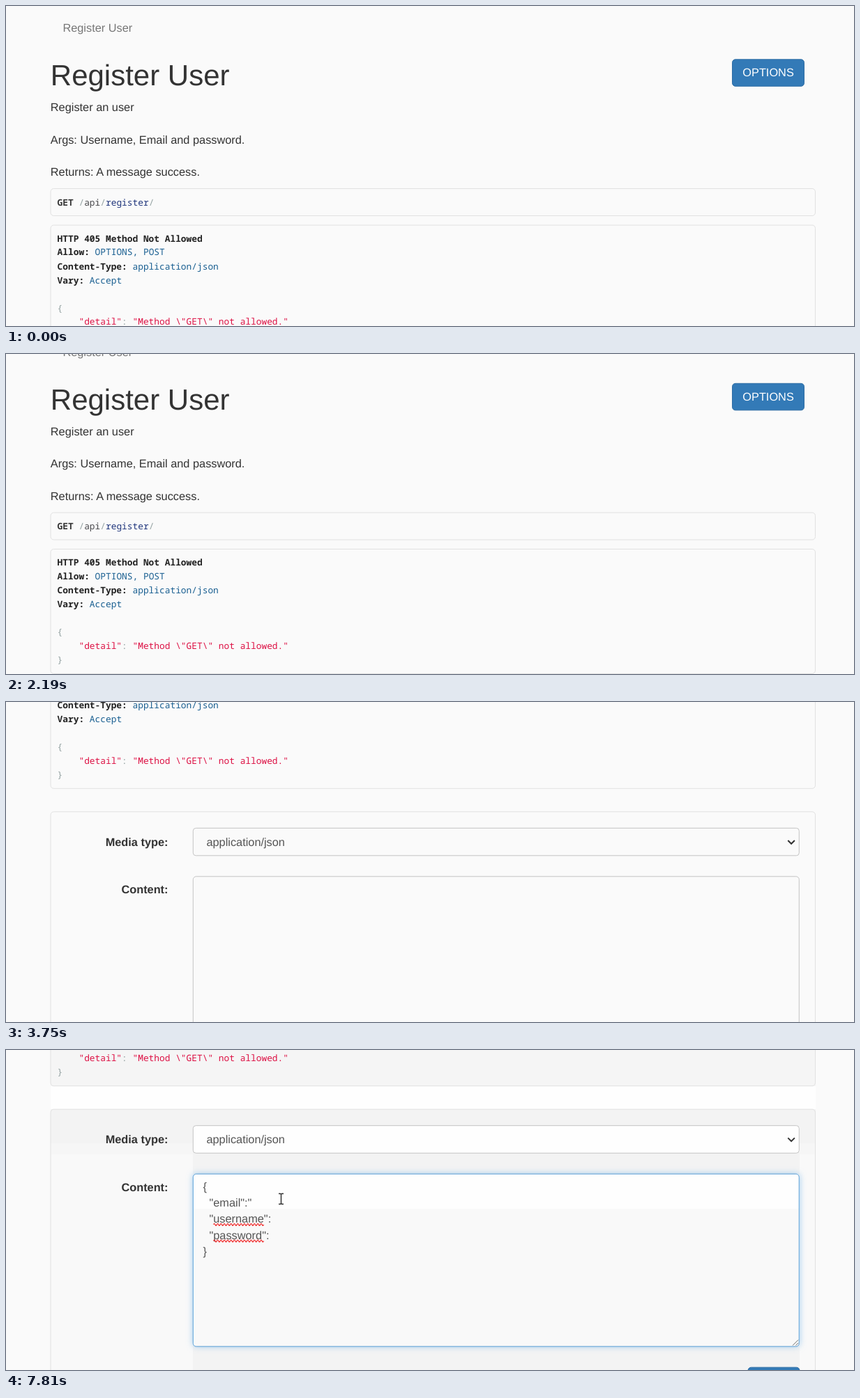
Write an HTML page that moves like this. It is 1216 px wide and 460 px high and loops after 8 s.

```html
<!DOCTYPE html>
<html lang="en">
<head>
<meta charset="utf-8">
<title>Register User</title>
<style>
  html, body { margin: 0; width: 100%; height: 100%; overflow: hidden; background: #fafafa; }
  svg { display: block; font: 16.33px "Liberation Sans", Arial, sans-serif; fill: #333; }
  text { white-space: pre; text-rendering: geometricPrecision; }
  .mono { font: 12.85px "Noto Sans Mono", monospace; }
  b, .b { font-weight: bold; }
  .label { font-weight: bold; text-anchor: end; }
  .head { font-weight: bold; fill: #222; }
  .lit { fill: #195f91; } .str { fill: #d14; } .pun { fill: #93a1a1; }
  .pln { fill: #48484c; } .kwd { fill: #1e347b; }
  .box { fill: none; stroke: #e1e1e1; }
  .field { fill: none; stroke: #c4c4c4; }
  .btn { fill: #337ab7; stroke: #2e6da4; }
  .hover { fill: #286090; stroke: #204d74; }
  .input { fill: #555; }
  .wavy { fill: none; stroke: #f02020; stroke-width: 1.2; }
  .line { fill: none; stroke: #333; }
  #glow { fill: #f9f9f9; filter: drop-shadow(0 0 4.7px rgba(102, 175, 233, .6)); }
</style>
</head>
<body>
<svg width="1216" height="460" viewBox="0 0 1216 460">
  <g id="shade">
    <rect x="64" width="1097" height="52" fill="#f5f5f5"/>
    <rect x="64" y="52" width="1097" height="33" fill="#fefefe"/>
    <rect x="64" y="85" width="1097" height="375" fill="#f9f9f9"/>
    <rect x="64" y="85" width="1097" height="49" fill="#f3f3f3"/>
    <rect x="64" y="134" width="1097" height="16" fill="#f6f6f6"/>
    <rect x="268" y="134" width="870" height="326" fill="#f3f3f3"/>
    <rect x="268" y="109" width="870" height="39" rx="4" fill="#fefefe"/>
    <rect id="glow" x="268" y="178" width="870" height="248" rx="4.7"/>
    <rect x="268" y="178" width="870" height="248" rx="4.7" fill="#f9f9f9"/>
    <rect x="268.5" y="178.5" width="869" height="50" rx="4" fill="#fefefe"/>
  </g>

  <g id="page">
    <text x="81.4" y="37" fill="#777">Register User</text>
    <text x="63.8" y="114" font-size="42">Register User</text>
    <rect id="options" class="btn" x="1041.5" y="76.8" width="103" height="38.5" rx="4.5"/>
    <text x="1056.3" y="101" fill="#fff">OPTIONS</text>
    <text x="63.8" y="151">Register an user</text>
    <text x="63.8" y="197.7">Args: Username, Email and password.</text>
    <text x="63.8" y="244.4">Returns: A message success.</text>

    <rect class="box" x="64" y="262.5" width="1096.5" height="39" rx="4.5"/>
    <rect class="box" x="64" y="315" width="1096.5" height="179" rx="4.5"/>
    <g class="mono">
      <text x="73.6" y="286.5"><tspan class="b">GET</tspan> <tspan class="pun">/</tspan><tspan class="pln">api</tspan><tspan class="pun">/</tspan><tspan class="kwd">register</tspan><tspan class="pun">/</tspan></text>
      <text x="73.6" y="338.6" class="head">HTTP 405 Method Not Allowed</text>
      <text x="73.6" y="358.4"><tspan class="head">Allow:</tspan> <tspan class="lit">OPTIONS, POST</tspan></text>
      <text x="73.6" y="378.6"><tspan class="head">Content-Type:</tspan> <tspan class="lit">application/json</tspan></text>
      <text x="73.6" y="398.5"><tspan class="head">Vary:</tspan> <tspan class="lit">Accept</tspan></text>
      <text x="73.6" y="438.5" class="pun">{</text>
      <text x="73.6" y="458.3" class="str">    "detail"<tspan class="pun">:</tspan> "Method \"GET\" not allowed."</text>
      <text x="73.6" y="478.7" class="pun">}</text>
    </g>

    <rect class="box" x="64" y="527.5" width="1096.5" height="460" rx="4.5"/>
    <text class="label" x="232.5" y="576.3">Media type:</text>
    <rect class="field" x="268.3" y="551" width="869" height="39.5" rx="4"/>
    <text class="input" x="287.4" y="576.3">application/json</text>
    <path class="line" stroke-width="2" d="M1121.3 568.7l4.8 4.8 4.8-4.8"/>
    <text class="label" x="232.5" y="645">Content:</text>
    <rect class="field" x="268.3" y="620.5" width="869" height="248" rx="4.5"/>
    <rect id="focus" class="field" x="268.3" y="620.5" width="869" height="248" rx="4.5" style="stroke:#66afe9"/>
    <path class="line" stroke-opacity=".7" d="M1128 867l8-8M1132.500 867l3.500-3.500"/>
    <rect class="btn" x="1064" y="898.5" width="74" height="39" rx="4.5"/>
  </g>

  <g id="json" class="input">
    <text x="282.4" y="201.700">{</text>
    <text id="email" x="282.4" y="225"></text>
    <text x="282.4" y="248.300">  "username":</text>
    <text x="282.4" y="271.600">  "password":</text>
    <text x="282.4" y="294.900">}</text>
    <path id="waves" class="wavy"/>
  </g>
  <path id="caret" class="line" d="M0 0v18.500"/>

  <g id="pointer">
    <path id="arrow" d="M.5.5v15.500l3.600-3.400 2.600 5.600 2.400-1.100-2.600-5.500h5z" fill="#fff" stroke="#000"/>
    <path id="hand" d="M4 1q1.500-1 2.500.5v6l7 1.700q1.500.6 1 3l-1.500 6h-7l-5-6q0-2 2-1l1 1z" fill="#fff" stroke="#000"/>
    <path id="beam" class="line" stroke-width="1.500" d="M-3.500-7.500h2.500l1 1 1-1h2.500M0-6.500v13M-3.500 7.500h2.500l1-1 1 1h2.500"/>
  </g>
</svg>
<script>
const LOOP = 8000;
const $ = id => document.getElementById(id);
const show = (id, on) => { $(id).style.display = on ? "" : "none"; };
const place = (id, x, y) => $(id).setAttribute("transform", `translate(${x} ${y})`);

// Each track is a list of [time, ...values]; a value holds until the next entry.
const scroll = [
  [0, 0], [1980, 2], [2050, 9], [2120, 20], [2190, 34.5], [2270, 50], [2310, 57.5], [2640, 61.5],
  [2790, 65], [2860, 73], [2930, 82], [3000, 90], [3070, 96],
  [3390, 101], [3460, 127], [3530, 172], [3600, 235], [3680, 310], [3750, 369.7],
  [3840, 402], [3900, 422], [3960, 434], [4030, 440], [4090, 442.3]
];
const pointer = [
  [0], [70, "arrow", 880, 236], [200, "arrow", 876, 201], [380, "arrow", 897, 184],
  [460, "arrow", 947, 148], [540, "arrow", 1016, 110], [610, "hand", 1043, 100],
  [690, "hand", 1082, 95], [770, "hand", 1125, 91], [840, "arrow", 1188, 85], [920],
  [4280, "arrow", 1120, 271], [4350, "beam", 1010, 270], [4420, "beam", 890, 268],
  [4490, "beam", 797, 265], [4560, "beam", 769, 261.5],
  [5320, "beam", 740, 259], [5390, "beam", 669, 255], [5460, "beam", 547, 252],
  [5530, "beam", 440, 240], [5600, "beam", 415, 226], [5670, "beam", 402, 218],
  [5740, "beam", 395, 214], [5860, "beam", 392, 213], [5930, "beam", 394.5, 214]
];
const caret = [
  [0], [4640, 283.5, 187.5], [5110], [5180, 289, 280.5], [5710], [5860, 346.5, 210.5],
  [6400], [6950, 346.5, 210.5], [7350, 353.5, 210.5], [7810]
];
const at = (track, t) => track.findLast(step => step[0] <= t);

const wave = (x, y, n) => `M${x} ${y}` + "q1.200-3 2.400 0t2.400 0".repeat(n);
$("waves").setAttribute("d", wave(297.5, 251, 15) + wave(297.5, 274.500, 15));

function draw(now) {
  const t = now % LOOP;
  place("page", 0, -at(scroll, t)[1]);
  show("shade", t >= 4090);

  const focus = Math.min(1, Math.max(0, (t - 4620) / 200));
  $("focus").style.opacity = $("glow").style.opacity = focus;

  show("json", t >= 5180);
  $("email").textContent = '  "email":' + (t >= 7350 ? '"' : "");

  const [, cx, cy] = at(caret, t);
  show("caret", cx);
  if (cx) place("caret", cx, cy);

  const [, kind, x, y] = at(pointer, t);
  for (const id of ["arrow", "hand", "beam"]) show(id, id === kind);
  if (kind) place("pointer", x, y);
  $("options").classList.toggle("hover", kind === "hand");

  requestAnimationFrame(draw);
}
requestAnimationFrame(draw);
</script>
</body>
</html>
```
